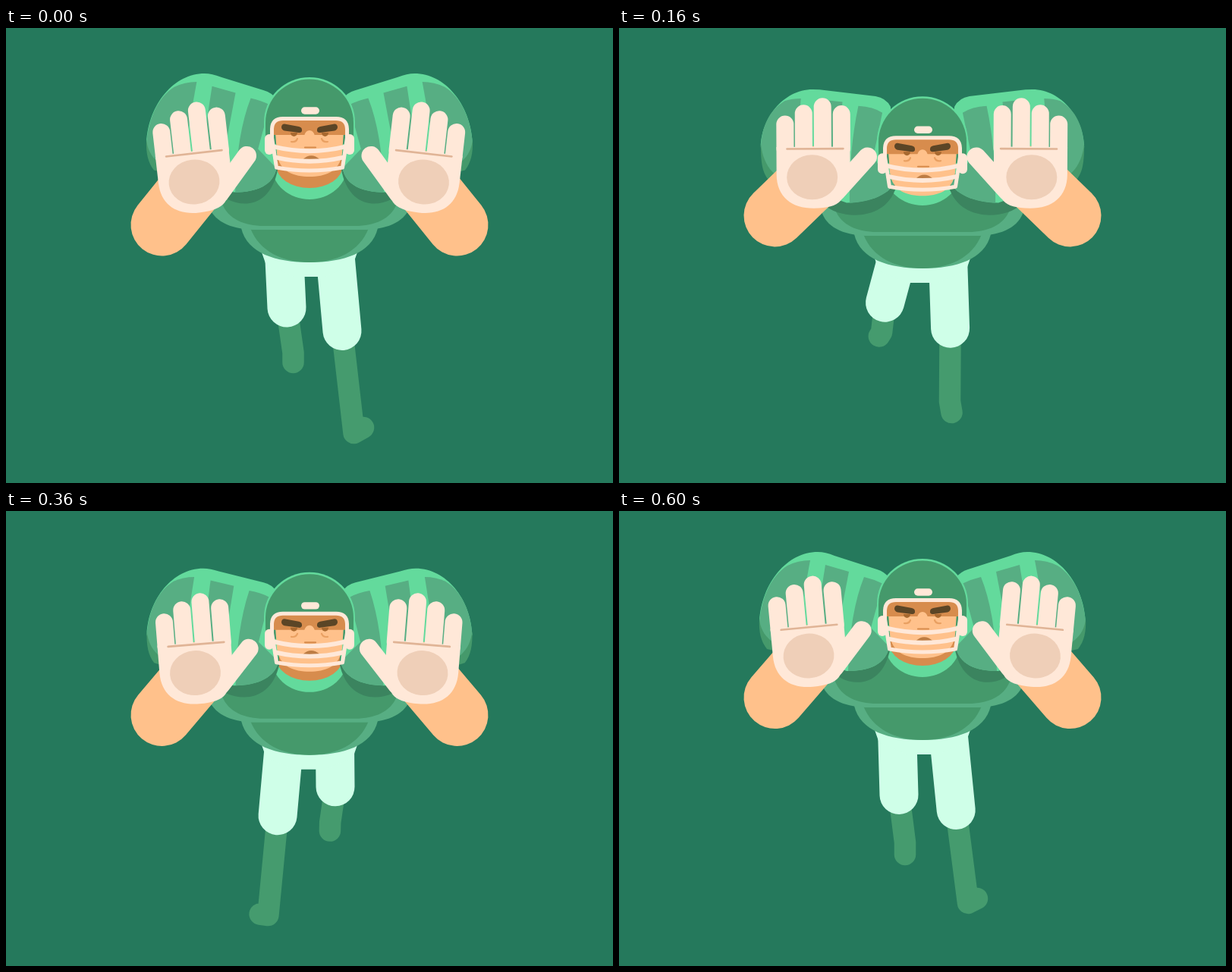
Write an HTML page with a canvas that moves like this. It is 800 px wide and 600 px high and loops after 640 ms.

```html
<!DOCTYPE html>
<html lang="en">
<head>
<meta charset="utf-8">
<title>Running lineman</title>
<style>
  html, body { margin: 0; width: 100%; height: 100%; overflow: hidden; background: #25795c; }
  canvas { display: block; width: 800px; height: 600px; }
</style>
</head>
<body>
<canvas id="stage" width="800" height="600"></canvas>
<script>
const ctx = document.getElementById('stage').getContext('2d');

const LOOP = 640, STRIDE = LOOP / 2, STEP = 40;
const C = {
  field: '#25795c', shadow: '#3b845f', jersey: '#45996b', pad: '#57ae83', bright: '#63da9c',
  pants: '#cfffe8', sock: '#459b6e', skin: '#ffc18b', shade: '#d78c4d', cream: '#ffe8d8',
  palm: '#efcfb8', crease: '#e0b496', brow: '#5b4526', eye: '#a8692f', bag: '#e9a062',
  mouth: '#bd7c43'
};

// Smooth periodic curve through keys placed at the given times.
function curve(times, period, values) {
  const n = times.length;
  const at = i => times[(i + n) % n] + period * Math.floor(i / n);
  const val = i => values[(i + n) % n];
  const rate = i => (val(i + 1) - val(i)) / (at(i + 1) - at(i));
  const tangent = i => {
    const a = at(i) - at(i - 1), b = at(i + 1) - at(i);
    return (rate(i - 1) * b + rate(i) * a) / (a + b);
  };
  return t => {
    t = ((t % period) + period) % period;
    let i = n - 1;
    while (times[i] > t) i--;
    const h = at(i + 1) - at(i), u = (t - at(i)) / h, v = 1 - u;
    return val(i) * v * v * (1 + 2 * u) + val(i + 1) * u * u * (3 - 2 * u)
      + h * u * v * (tangent(i) * v - tangent(i + 1) * u);
  };
}

const bob = (...v) => curve([0, 80, 120, 200, 280], STRIDE, v);
const swing = (...v) => curve([0, 120, 200, 280, 320, 440, 520, 600], LOOP, v);

const body = {
  waist: bob(309, 332, 331, 302, 302),
  head: bob(65, 98, 104, 72, 63),
  pad: bob(60, 91, 96, 62, 54),
  lean: bob(0.95, 0.35, 0, 0.33, 1),
  elbow: bob(259.5, 271, 262, 236, 246),
  handX: bob(248, 252.5, 255, 253, 250),
  handY: bob(203, 218, 211.5, 184, 191),
  tilt: bob(-6.5, -1.8, 0, -1.7, -5.4)
};

const leg = {
  kneeX: swing(443, 439.2, 434, 431, 430, 447, 450, 444.2),
  kneeY: swing(399.5, 399.5, 391, 374.5, 369, 359, 369, 394.5),
  heelX: swing(458.5, 442.5, 430, 423, 421.5, 447.5, 458.5, 460),
  heelY: swing(534, 503, 479, 437, 428, 385, 430, 517),
  toeX: swing(471, 447, 431, 423, 421.5, 448, 465, 472),
  toeY: swing(527, 518, 492.5, 453, 441, 393, 432, 511)
};

// Each pad part: colour, upright outline, leaning outline.
const padParts = [
  [C.shadow,
    'M270 152C290 171 352 175 366 128L366 100L280 100Z',
    'M275 152C295 178 347 187 358 125L356 100L280 100Z'],
  [C.bright,
    'M187 75C187 40 215 0 255 0Q264 0 272 1L338 8Q352 10 358 22L366 118C362 132 340 148 300 149L230 124C208 118 191 104 187 75Z',
    'M185 92C188 40 222 0 262 0Q272 0 284 5L340 23Q350 26 356 34L356 125C352 148 330 157 300 157L230 130C205 124 187 112 185 92Z'],
  [C.pad,
    'M187 75C188 48 198 27 218 15Q228 12 239 12L230 124C208 118 191 104 187 75Z',
    'M185 92C188 60 200 32 222 18Q236 11 252 11L230 130C205 124 187 112 185 92Z'],
  [C.pad,
    'M264 13L294 16L282 140L258 130Z',
    'M272 17L303 26L280 145L254 130Z'],
  [C.pad,
    'M315 21Q335 22 347 30L335 90L366 118C362 132 340 148 304 149Q303 80 315 21Z',
    'M323 33Q336 36 348 42L332 100L356 125C352 148 330 157 302 157Q304 80 323 33Z'],
  [C.jersey,
    'M187 71C187 95 189 108 196 117L230 134L230 124C208 118 191 104 187 71Z',
    'M185 88C184 105 187 118 195 128L230 136L230 130C205 124 187 112 185 88Z']
];

function mixPath(a, b, p) {
  const ends = b.match(/[\d.]+/g);
  let i = 0;
  return a.replace(/[\d.]+/g, n => +n + (ends[i++] - n) * p);
}

function fill(color, d) {
  ctx.fillStyle = color;
  ctx.fill(new Path2D(d));
}

function stroke(color, width, d) {
  ctx.strokeStyle = color;
  ctx.lineWidth = width;
  ctx.stroke(new Path2D(d));
}

function oval(color, x, y, rx, ry) {
  ctx.fillStyle = color;
  ctx.beginPath();
  ctx.ellipse(x, y, rx, ry, 0, 0, Math.PI * 2);
  ctx.fill();
}

function pill(color, x, y, w, h) {
  ctx.fillStyle = color;
  ctx.beginPath();
  ctx.roundRect(x, y, w, h, Math.min(w, h) / 2);
  ctx.fill();
}

function shifted(x, y, draw) {
  ctx.save();
  ctx.translate(x, y);
  draw();
  ctx.restore();
}

// Draws once as is and once mirrored about the middle of the stage.
function bothSides(draw) {
  draw(false);
  ctx.save();
  ctx.translate(800, 0);
  ctx.scale(-1, 1);
  draw(true);
  ctx.restore();
}

function drawLegs(t, waist) {
  const time = mirrored => t + (mirrored ? STRIDE : 0);
  bothSides(m => {
    const k = {};
    for (const name in leg) k[name] = leg[name](time(m));
    stroke(C.sock, 28.5, `M${k.kneeX} ${k.kneeY}L${k.heelX} ${k.heelY}L${k.toeX} ${k.toeY}`);
  });
  bothSides(m => {
    const x = leg.kneeX(time(m)), y = leg.kneeY(time(m));
    stroke(C.pants, 51, `M433.5 ${waist - 14}L${x} ${y}`);
  });
  shifted(0, waist, () => fill(C.pants, 'M336 -16H464L457 4L420 19H380L343 4Z'));
}

function drawTorso() {
  fill(C.pad, 'M310 -45C318 -12 355 0 400 0C445 0 482 -12 490 -45Z');
  fill(C.jersey, 'M322 -45C334 -14 365 0 400 0C435 0 466 -14 478 -45Z');
  fill(C.pad, 'M265 -110L268 -72C276 -52 300 -43 330 -43H470C500 -43 524 -52 532 -72L535 -110Z');
  fill(C.jersey, 'M285 -110V-77C293 -57 314 -48 340 -48H460C486 -48 507 -57 515 -77V-110Z');
  oval(C.bright, 400, -128, 50, 45);
  oval(C.shade, 400, -128, 44, 30);
}

function drawHead() {
  fill(C.bright, 'M340 88V59A60 59 0 0 1 460 59V88Z');
  fill(C.jersey, 'M342 88V60A58 57.5 0 0 1 458 60V88Z');
  pill(C.cream, 389, 39.3, 24, 9.4);

  fill(C.skin, 'M354 57H446L443 100C440 125 420 131 400 131C380 131 360 125 357 100Z');
  fill(C.shade, 'M353 56H447V76H353Z');
  fill(C.skin, 'M393 77Q395 70 400 70Q405 70 407 77Z');
  bothSides(() => {
    fill(C.eye, 'M375 73H384A4.5 5 0 0 1 375 73');
    stroke(C.bag, 2.2, 'M376 85Q382 86 384 81');
    fill(C.brow, 'M367 61.5L386 65Q390 66 390 69V71Q389 73.5 386 73L367 70.5Q363 69 363 65.5Q363.5 61.5 367 61.5Z');
  });
  stroke(C.shade, 2.2, 'M394 92.5H408');
  fill(C.mouth, 'M391 108.5Q402 98 414 108.5Z');

  stroke(C.cream, 5, 'M350.5 80V68Q351 54.5 365 54.5H435Q449 54.5 449.5 68V80L443.5 119Q400 127 356.5 119Z');
  stroke(C.cream, 5.8, 'M353 91.5Q400 103 447 91.5M355 105.5Q400 116 445 105.5');
  bothSides(() => pill(C.cream, 341, 75, 12, 27));
}

function drawHand() {
  const tips = [[-35.5, -70], [-11, -84], [14, -93], [39, -83]];
  for (const [x, y] of tips) stroke(C.cream, 23, `M${x} ${y}V-38`);
  fill(C.cream, 'M-47 -40V-4C-47 26 -27 41 2 41C20 41 31 38 37 31.5L50 14V-40Z');
  stroke(C.cream, 25, 'M32 18.5L73 -26.5');
  stroke(C.crease, 2.6, 'M-33 -37.5H41');
  oval(C.palm, 0, 0, 33.5, 29.5);
}

function draw(t) {
  const b = {};
  for (const name in body) b[name] = body[name](t);

  ctx.fillStyle = C.field;
  ctx.fillRect(0, 0, 800, 600);
  ctx.lineCap = ctx.lineJoin = 'round';

  drawLegs(t, b.waist);
  shifted(0, b.waist, drawTorso);
  bothSides(() => shifted(0, b.pad, () => {
    for (const [color, upright, leaning] of padParts) fill(color, mixPath(upright, leaning, b.lean));
  }));
  shifted(0, b.head, drawHead);
  bothSides(mirrored => {
    stroke(C.skin, 82, `M205.5 ${b.elbow}L${b.handX + 3} ${b.handY}`);
    // The right hand sits slightly closer to the middle.
    shifted(b.handX + (mirrored ? 1.5 : 0), b.handY, () => {
      ctx.rotate(b.tilt * Math.PI / 180);
      drawHand();
    });
  });
}

const start = performance.now();
function tick() {
  const t = (performance.now() - start) % LOOP;
  draw(Math.floor(t / STEP) * STEP);
  requestAnimationFrame(tick);
}
tick();
</script>
</body>
</html>
```
